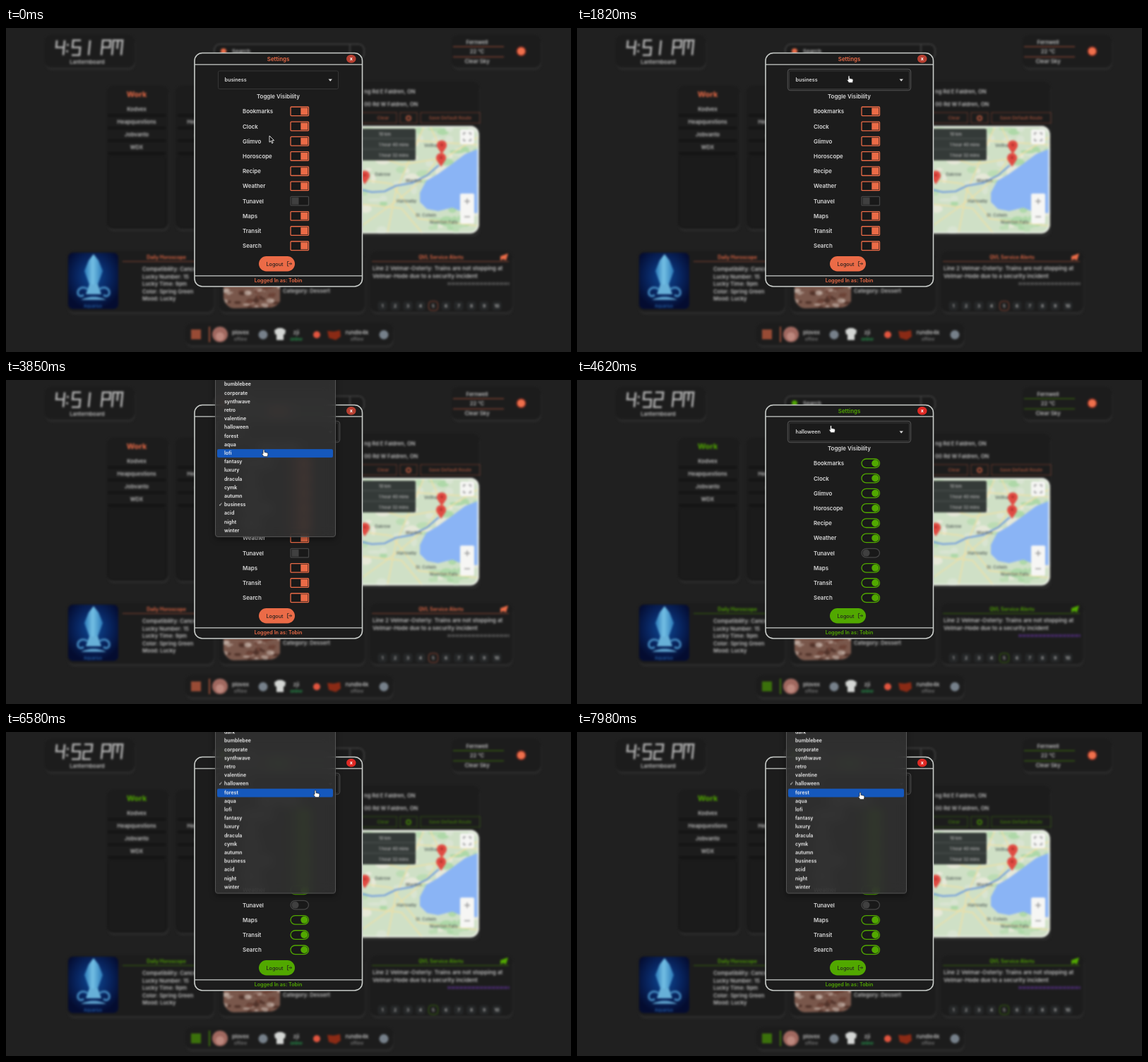
Animation, 800 px wide and 460 px high, one loop 8000 ms. Source, as an HTML page:

```html
<!DOCTYPE html>
<html lang="en">
<head>
<meta charset="utf-8">
<title>Settings</title>
<style>
html, body { margin: 0; width: 100%; height: 100%; overflow: hidden; background: #202020; }
body { --accent: #eb6b47; --late: #eb6b47; --error: #b84032; --round: 1px; --knob: 0px; --meta: #484848; }
body.green { --accent: #51a800; --error: #e02a25; --round: 6.5px; --knob: 5px; --meta: #40285e; }
body.settled { --late: #51a800; }
#stage { position: relative; width: 800px; height: 460px; overflow: hidden; font-family: Inter, sans-serif; }
svg { position: absolute; inset: 0; }
text { font: 600 7.9px Inter, sans-serif; fill: #d8d8d8; dominant-baseline: central; }
#page { filter: blur(1.4px); }
#page text { font-size: 7.6px; fill: #bdbdbd; }
#page .map text { font-size: 6px; fill: #5d6862; }
.mid { text-anchor: middle; }
text.accent, #page text.accent { fill: var(--accent); }
#page text.late { fill: var(--late); opacity: .6; font-size: 6.6px; }
.fill { fill: var(--accent); }
.line { stroke: var(--accent); fill: none; }
.lateLine { stroke: var(--late); fill: none; }
.toggle { rx: var(--round); fill: #191919; stroke: var(--accent); stroke-width: 1.3; }
.knob { rx: var(--knob); fill: var(--accent); }
.off .toggle { stroke: #454545; }
.off .knob { fill: #404040; }
#menu { position: absolute; left: 296px; top: 0; width: 169px; border: 1px solid #555;
  border-radius: 4px; background: rgba(50, 50, 50, .82); backdrop-filter: blur(8px); box-shadow: 0 3px 8px #0006; }
#menu div { position: absolute; left: 2px; width: 154px; height: 12.2px; padding-left: 10px;
  font: 600 7px/12.2px Inter, sans-serif; color: #f2f2f2; border-radius: 2px; white-space: pre; }
#menu div.hot { background: #1558bd; }
#menu div.on::before { content: "✓"; position: absolute; left: 2px; font: 700 7px/12.2px "DejaVu Sans", sans-serif; }
</style>
</head>
<body>
<div id="stage">
<svg width="800" height="460" viewBox="0 0 800 460">
  <defs>
    <radialGradient id="glow" cy=".42" r=".6"><stop stop-color="#0d4a96"/><stop offset=".55" stop-color="#082560"/><stop offset="1" stop-color="#040c30"/></radialGradient>
    <linearGradient id="glass"><stop stop-color="#2a78b8"/><stop offset=".45" stop-color="#74c0e4"/><stop offset="1" stop-color="#2a78b8"/></linearGradient>
    <clipPath id="mapClip"><rect x="470" y="139" width="199.500" height="152.500" rx="12"/></clipPath>
    <clipPath id="loafClip"><path d="M308 350q38-20 80 4v34q-5 9-16 9l-50 1q-10-1-14-14z"/></clipPath>
  </defs>
  <rect width="800" height="460" fill="#202020"/>
  <g id="page">
    <g id="cards"></g>
    <path id="clock" fill="none" stroke="#b4b4b4" stroke-width="2.600"/>
    <text class="mid" x="115" y="48">Lanternboard</text>

    <rect x="295" y="23" width="212" height="21" rx="8" fill="#1b1b1b" stroke="#3c3c3c" stroke-width="2"/>
    <circle class="fill" cx="308" cy="33" r="4"/>
    <text x="320" y="33">Search</text>
    <path d="M487 24V43" stroke="#3c3c3c" stroke-width="2"/>

    <path class="line" d="M633 26.500H705M633 41H705" opacity=".65"/>
    <text class="mid" x="667" y="20">Fernwell</text>
    <text class="mid" x="667" y="33.500">22 °C</text>
    <text class="mid" x="667" y="47.500">Clear Sky</text>
    <circle cx="729.500" cy="33" r="7" fill="#7c2a20"/>
    <circle cx="729.500" cy="33" r="5.500" fill="#f0704c"/>

    <g id="bookmarks"></g>

    <text x="507" y="90">ng Rd E Faldren, ON</text>
    <text x="507" y="108.500">00 Rd W Faldren, ON</text>
    <g class="lateLine" opacity=".35">
      <rect x="490" y="120" width="63" height="15"/><rect x="558" y="120" width="24" height="15"/><rect x="587" y="120" width="84" height="15"/>
    </g>
    <circle class="lateLine" cx="570" cy="128" r="3" stroke-width="2" opacity=".7"/>
    <text class="late mid" x="534" y="128">Clear</text>
    <text class="late mid" x="629" y="128">Save Default Route</text>

    <g class="map" clip-path="url(#mapClip)">
      <rect x="470" y="139" width="200" height="153" fill="#cfe0c6"/>
      <g id="terrain"></g>
      <path d="M500 174l60 20 62-10 48-30M505 280l50-36 38-32 30-44M540 292l12-60 40-93M500 215l45 6 40 50 85 10M582 160l88 6M500 250l60 6 30 36M600 139l20 40" fill="none" stroke="#efdfa4" stroke-width="1.500"/>
      <path d="M670 171l-20 8-20 15-18 13-17 10-9 17 0 13 10 10 16 3 20-5 16 7 22 1z" fill="#8ab4f5"/>
      <path d="M500 229l18 4 18-1 16-8 23-4 20-10 18-15" fill="none" stroke="#6594de" stroke-width="2"/>
      <g id="places"></g>
      <rect x="490" y="143" width="90" height="45" rx="2" fill="#343a38"/>
      <path d="M490 157H580M490 172H580" stroke="#525856"/>
      <g id="routes"></g>
      <g id="pins" fill="#e04a42"></g>
      <g fill="#f6f6f4">
        <rect x="643" y="144" width="20" height="21" rx="2"/><rect x="643" y="235" width="20" height="43" rx="2"/>
      </g>
      <path d="M648 152v-3h3M655 149h3v3M658 157v3h-3M651 160h-3v-3M649 246h8M653 242v8M649 268h8" fill="none" stroke="#999" stroke-width="1.500"/>
      <rect x="470" y="139" width="199.500" height="152.500" rx="12" fill="none" stroke="#eef1ea" stroke-width="4"/>
    </g>

    <g id="horoscope">
      <rect x="88" y="319" width="71" height="80" rx="7" fill="url(#glow)"/>
      <path d="M124 321l-7 9-6 15 7 19h12l7-19-6-15z" fill="url(#glass)"/>
      <path d="M118 364h12l5 14h-22z" fill="#67b0d8"/>
      <path d="M116 371c-8-6-16 0-14 7q3 5 8 1M132 371c8-6 16 0 14 7q-3 5-8 1" fill="none" stroke="#4388bd" stroke-width="3"/>
      <path d="M106 386q18-9 36 0z" fill="#5c9fca"/>
      <text class="mid" x="123" y="394" style="fill:#235a9c;font-size:6px">Aquarius</text>
    </g>
    <path class="line" d="M165 331.500H290M518 331.500H712" opacity=".5"/>
    <text class="accent mid" x="227" y="325" style="font-size:7px">Daily Horoscope</text>
    <g id="fortune"></g>

    <g clip-path="url(#loafClip)">
      <rect x="308" y="335" width="80" height="63" fill="#79574b"/>
      <g id="crumbs"></g>
    </g>
    <text x="392" y="373">Category: Dessert</text>

    <text class="accent mid" x="616" y="325" style="font-size:7px">QVL Service Alerts</text>
    <path class="fill" d="M700 324l11-4-3 10-4-2-4 2z"/>
    <text x="519" y="341" style="font-size:7.900px">Line 2 Velmar-Osterly: Trains are not stopping at</text>
    <text x="519" y="351.500" style="font-size:7.900px">Velmar-Hode due to a security incident</text>
    <path d="M625 363H713" style="stroke:var(--meta)" stroke-width="4" stroke-dasharray="5 .7"/>
    <g id="pager"></g>

    <rect class="fill" x="262" y="428" width="14" height="14" opacity=".6"/>
    <path class="line" d="M288 424V446" stroke-width="1.500" opacity=".8"/>
    <circle cx="303" cy="435" r="11" fill="#a0685f"/><circle cx="303" cy="438" r="6" fill="#bd887e"/>
    <path d="M380 429l5-3h6l5 3-1 6h-2v8h-10v-8h-2z" fill="#d4d6d4"/>
    <path d="M455 430l9 1 9-2 1 9-7 5-10-3z" fill="#8a2a15"/>
    <g id="streams"></g>
  </g>

  <rect x="267" y="35.500" width="237.500" height="331.500" rx="11" fill="#1c1c1c" stroke="#c9cdca" stroke-width="1.600"/>
  <path d="M267 51.900H504M267 351.900H504" stroke="#c9cdca" stroke-width="1.400"/>
  <text class="accent mid" x="385.500" y="44.300">Settings</text>
  <rect x="482" y="38" width="13.500" height="11.500" rx="5.750" style="fill:var(--error)"/>
  <text class="mid" x="488.700" y="43.500" style="font-size:7px;fill:#fff;font-weight:700">x</text>
  <rect id="ring" x="298.500" y="58.500" width="174" height="30" rx="4" fill="none" stroke="#464646" stroke-width="1.600"/>
  <rect x="300.500" y="61" width="170" height="25.500" rx="2" fill="#1a1a1a" stroke="#363636"/>
  <text id="choice" x="309.500" y="73.700" style="font-size:7.200px"></text>
  <path d="M456.500 72.500h5.400l-2.700 3.200z" fill="#ddd"/>
  <text class="mid" x="385.500" y="97.300">Toggle Visibility</text>
  <g id="toggles"></g>
  <rect class="fill" x="358" y="324" width="51" height="21.500" rx="10.750"/>
  <text x="368.500" y="335" style="font-size:7.200px;font-weight:500;fill:#24211f">Logout</text>
  <path d="M400.500 331.500h-2v6.500h2M400 334.700h4.500M402.800 333l1.700 1.700-1.700 1.700" fill="none" stroke="#24211f" stroke-width=".8"/>
  <text class="accent mid" x="385.500" y="358.300" style="font-size:7.200px">Logged In as: Tobin</text>
</svg>
<div id="menu"></div>
<svg width="800" height="460" viewBox="0 0 800 460">
  <g id="cursor" stroke-linejoin="round">
    <path id="arrow" d="M0 0v9.200l2.100-2 1.500 3.500 1.500-.7-1.500-3.300h3z" fill="#111" stroke="#eee" stroke-width=".9"/>
    <path id="hand" d="M0 1q1-1.600 2 0v3l3.800.8q1.300.4 1.200 1.800l-.7 3.600h-5.300l-2.600-3.800q-.3-1.300 1.600-.3z" fill="#fff" stroke="#222" stroke-width=".7"/>
  </g>
</svg>
</div>
<script>
const $ = id => document.getElementById(id);
const put = (id, list, draw) => { $(id).innerHTML = list.map(draw).join(''); };
const label = (x, y, s, cls = '', style = '') => `<text x="${x}" y="${y}" class="${cls}" style="${style}">${s}</text>`;
const range = n => [...Array(n).keys()];

let seed = 7;
const random = () => (seed = seed * 16807 % 2147483647) / 2147483647;
// Scatters soft blobs in a box, cycling through the given colours
const scatter = (id, n, [x, y, w, h], size, colours) => put(id, range(n), i =>
  `<ellipse cx="${x + w * random()}" cy="${y + h * random()}" rx="${size * (.4 + random())}" ry="${size * (.3 + .6 * random())}" fill="${colours[i % colours.length]}"/>`);
scatter('terrain', 90, [500, 139, 170, 153], 8, ['#aed8a8', '#e6e8d8', '#bcdcb4', '#d9e4d2']);
scatter('crumbs', 80, [308, 340, 80, 58], 4, ['#a58d82', '#503229', '#b9a49a', '#6d4438']);

put('cards', [[55, 10, 127, 46], [631, 10, 126, 46], [143, 82, 87, 203], [240, 82, 91, 203], [480, 76, 190, 216],
  [87, 317, 207, 86], [302, 317, 206, 86], [516, 317, 201, 86], [254, 419, 294, 31]], ([x, y, w, h]) =>
  `<rect x="${x + 1}" y="${y + 4}" width="${w}" height="${h}" rx="9" fill="#292929"/>
   <rect x="${x}" y="${y}" width="${w}" height="${h}" rx="9" fill="#1c1c1c"/>`);

const links = ['Kodvex', 'Heapquestions', 'Jobvanto', 'WDX'];
put('bookmarks', [[185, 'Work'], [284, 'Social']], ([x, title]) =>
  label(x, 94, title, 'accent mid', 'font-size:11px;font-weight:700') +
  links.map((s, i) => `<path d="M${x - 41} ${124 + 18 * i}h82" stroke="#121212" stroke-width="3"/>` +
    label(x, 115 + 18 * i, s, 'mid')).join('') +
  `<rect x="${x - 41}" y="181" width="82" height="102" rx="6" fill="#1b1b1b" stroke="#151515"/>`);

put('places', [[522, 207, 'Oakrow'], [566, 216, 'Marden'], [592, 166, 'Vellham'], [553, 245, 'Harrowby'], [580, 265, 'St. Colwin'], [600, 275, 'Niverton Falls']],
  ([x, y, s]) => label(x, y, s));
put('routes', ['10 km', '1 hour 40 mins', '1 hour 32 mins'], (s, i) => label(528, 150 + 15 * i, s, '', 'fill:#aaa'));
put('pins', [[617, 168], [616, 186], [508, 211]], ([x, y]) =>
  `<path d="M${x} ${y + 11}l-6-9a7 7 0 1 1 12 0z"/><circle cx="${x}" cy="${y - 2}" r="2" fill="#b3302a"/>`);
put('fortune', ['Compatibility: Cancer', 'Lucky Number: 15', 'Lucky Time: 9pm', 'Color: Spring Green', 'Mood: Lucky'],
  (s, i) => label(193, 342.5 + 10.5 * i, s));
put('pager', range(10), i =>
  `<rect x="${526.5 + 18 * i}" y="388" width="13" height="13" rx="4" fill="#252728" ${i === 4 ? 'class="line" stroke-opacity=".55"' : ''}/>` +
  label(533 + 18 * i, 394.5, i + 1, 'mid', 'font-size:6.5px'));
put('streams', [[332, 'plovex', 364], [411, 'zji', 440], [497, 'rundle4k', 535]], ([x, name, dot], i) =>
  label(x, 432, name, 'mid') + label(x, 441.5, i === 1 ? 'online' : 'offline', 'mid', `font-size:6px;fill:${i === 1 ? '#279b50' : '#777'}`) +
  `<circle cx="${dot}" cy="435.500" r="${i === 1 ? 5 : 6.5}" fill="${i === 1 ? '#e2553f' : '#76808a'}"/>`);

put('toggles', ['Bookmarks', 'Clock', 'Glimvo', 'Horoscope', 'Recipe', 'Weather', 'Tunavel', 'Maps', 'Transit', 'Search'], (s, i) => {
  const y = 118.3 + 21.22 * i, off = i === 6;
  return label(335, y, s) + `<g class="${off ? 'off' : ''}">
    <rect class="toggle" x="403" y="${y - 6.3}" width="25.500" height="12.600"/>
    <rect class="knob" x="${off ? 404.5 : 417.3}" y="${y - 5}" width="10" height="10"/></g>`;
});

const themes = 'light dark bumblebee corporate synthwave retro valentine halloween forest aqua lofi fantasy luxury dracula cymk autumn business acid night winter'.split(' ');
const ROW = 12.2;
put('menu', themes, (s, i) => `<div style="top:${i * ROW}px">${s}</div>`);
$('menu').style.height = `${themes.length * ROW + 1.5}px`;
const rows = [...$('menu').children];

// Seven-segment glyphs on a slanted 11 x 21 cell
const glyphs = {
  4: 'M0 0V10H11M11 0V21', 5: 'M11 0H0V10H11V21H0', 1: 'M8 0V21', 2: 'M0 0H11V10H0V21H11',
  ':': 'M2 5v3M2 14v3', P: 'M0 21V0H11V10H0', M: 'M0 21V0H13V21M6.5 0V12'
};
const clockPath = digit => [['4', 70], [':', 84], ['5', 93], [digit, 109], ['P', 135], ['M', 150]].map(([c, x]) => {
  let px = 0, py = 0;
  return glyphs[c].replace(/([MHVv])([\d.]+)(?: ([\d.]+))?/g, (_, op, a, b) => {
    if (op === 'M') { px = +a; py = +b; }
    else if (op === 'H') px = +a;
    else py = op === 'v' ? py + +a : +a;
    return `${op === 'M' ? 'M' : 'L'}${x + px + (21 - py) * .1} ${17.5 + py}`;
  });
}).join('');
const clocks = { before: clockPath('1'), after: clockPath('2') };

const ease = u => u * u * (3 - 2 * u);
function along(keys, t) {
  const i = keys.findIndex(k => k[0] > t);
  if (i < 0) return keys[keys.length - 1].slice(1);
  const [a, b] = [keys[i - 1], keys[i]], u = ease((t - a[0]) / (b[0] - a[0]));
  return a.slice(1).map((v, j) => v + (b[j + 1] - v) * u);
}
const pointer = [[0, 373, 153], [500, 373, 153], [1500, 384, 67.5], [2300, 384, 67.5], [2850, 372.5, 86.5], [3200, 372, 86.5],
  [3850, 364, 98.5], [4400, 358.5, 64.5], [5600, 358.5, 64.5], [6150, 390, 74], [6580, 437, 82.5], [7000, 437, 82.5], [7850, 400, 85.5]];
const scroll = [[0, 0], [3000, 0], [3700, 103.4]];

function draw(now) {
  const t = now % 8000, green = t >= 4500;
  const [x, y] = along(pointer, t);
  document.body.className = (green ? 'green ' : '') + (t >= 5600 ? 'settled' : '');
  $('clock').setAttribute('d', green ? clocks.after : clocks.before);

  const selected = themes.indexOf(green ? 'halloween' : 'business');
  $('choice').textContent = themes[selected];
  $('ring').style.display = t >= 1700 ? '' : 'none';

  const open = t >= 2300 && t < 4500 || t >= 6200;
  const top = 74 - (selected + .5) * ROW + (green ? 0 : along(scroll, t)[0]);
  const hot = Math.floor((y - top) / ROW);
  $('menu').style.display = open ? '' : 'none';
  $('menu').style.transform = `translateY(${top - 1}px)`;
  rows.forEach((row, i) => { row.className = (i === hot ? 'hot ' : '') + (i === selected ? 'on' : ''); });

  const hand = t >= 1400;
  $('cursor').setAttribute('transform', `translate(${x} ${y})`);
  $('hand').style.display = hand ? '' : 'none';
  $('arrow').style.display = hand ? 'none' : '';
}
function tick() {
  draw(performance.now());
  requestAnimationFrame(tick);
}
tick();
</script>
</body>
</html>
```
